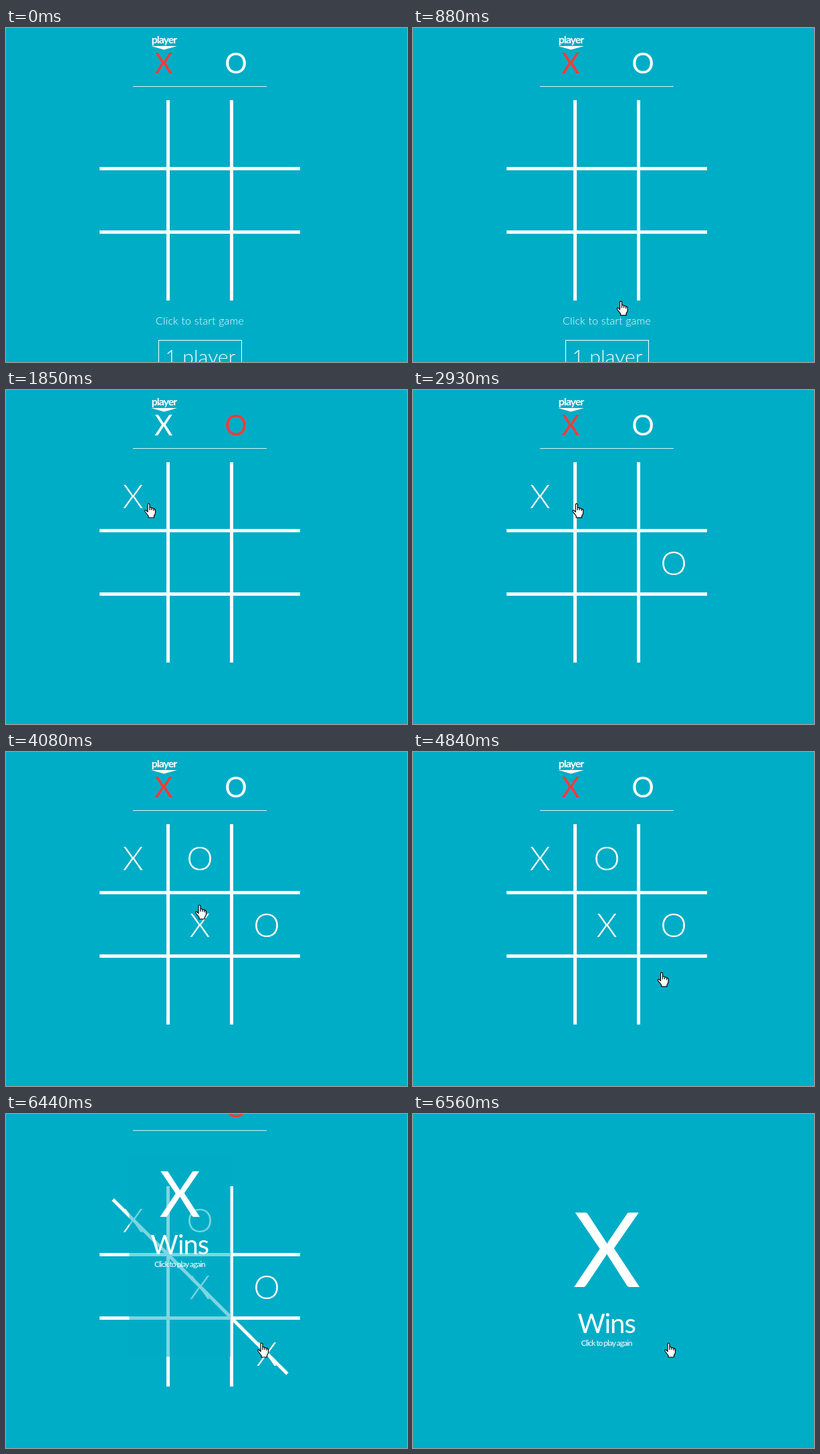
An HTML page that plays this animation: 600x500 px, repeating every 9.77 s.

```html
<!DOCTYPE html>
<html lang="en">
<head>
<meta charset="utf-8">
<title>Tic-tac-toe</title>
<style>
  html, body { margin: 0; width: 100%; height: 100%; overflow: hidden; background: #00adc6; }
  svg { display: block; width: 600px; height: 500px; }
  text { font-family: Lato, sans-serif; fill: #fff; text-anchor: middle; }
  .turn { font-size: 42px; }
  .mark { font-size: 50px; font-weight: 300; }
  .tight { letter-spacing: -1px; }
  .light { font-weight: 300; letter-spacing: .17px; }
</style>
</head>
<body>
<svg viewBox="0 0 600 500">
  <path d="M242.5 108V408M337.5 108V408M140 210.5H440M140 305.5H440" stroke="#fff" stroke-width="5"/>
  <g id="marks"></g>
  <line id="strike" x1="160" y1="128" stroke="#fff" stroke-width="5"/>
  <g id="start">
    <text class="light" x="290" y="444" font-size="16">Click to start game</text>
    <rect x="228.5" y="467.5" width="124" height="60" fill="none" stroke="#fff"/>
    <text class="light" x="291" y="503" font-size="30">1 player</text>
  </g>
  <g id="header">
    <g id="left">
      <text class="tight" x="236.5" y="23" font-size="16" font-weight="700">player</text>
      <path d="M217 27H256L236.500 32.500Z" fill="#fff"/>
      <text class="turn" id="turnX" x="236" y="68">X</text>
    </g>
    <text class="turn" id="turnO" x="344" y="68">O</text>
    <rect x="190" y="87" width="200" height="1" fill="#fff" opacity=".85"/>
  </g>
  <g id="result">
    <rect id="panel" height="300" fill="#00adc6"/>
    <g id="words">
      <text id="winner">X</text>
      <text class="tight" id="wins" font-size="40">Wins</text>
      <text class="tight" id="again" font-size="12">Click to play again</text>
    </g>
  </g>
  <g id="hand" stroke="#000" stroke-width="1.2" stroke-linejoin="round">
    <path d="M5 2Q6.500 0 8 2V7Q10 6 11 8Q13 7 14 9Q16 8.500 16.500 10.500V15Q16 18 14.500 19V22H6V19.500L1 13Q0 10.500 2.500 11L5 13.500Z" fill="#fff"/>
    <path d="M8 7v4M11 8v3M14 9v3" fill="none"/>
  </g>
</svg>
<script>
const LOOP = 9770, WIN = 6020;
const $ = id => document.getElementById(id);
const set = (id, attrs) => {
  for (const key in attrs) $(id).setAttribute(key, attrs[key]);
};
const show = (el, on) => el.style.display = on ? '' : 'none';
const span = (t, from, to) => Math.min(1, Math.max(0, (t - from) / (to - from)));
const smooth = u => u * u * (3 - 2 * u);
const mix = (a, b, u) => a + (b - a) * u;

// time, symbol, column, row
const moves = [[1850, 'X', 0, 0], [2340, 'O', 2, 1], [3590, 'X', 1, 1], [4080, 'O', 1, 0], [WIN, 'X', 2, 2]];
const marks = moves.map(([, symbol, col, row]) => {
  const el = document.createElementNS('http://www.w3.org/2000/svg', 'text');
  el.textContent = symbol;
  el.setAttribute('class', 'mark');
  el.setAttribute('x', 190 + 100 * col);
  el.setAttribute('y', 177 + 100 * row);
  return $('marks').appendChild(el);
});

// from, to, start point, end point, easing
const easeOut = u => 1 - (1 - u) ** 1.6;
const glides = [
  [740, 1540, [340, 495], [207, 169], easeOut],
  [2930, 3140, [238, 169], [275, 195], u => u],
  [3140, 3280, [275, 195], [287, 222], u => u],
  [3280, 3350, [287, 222], [283, 228], u => u],
  [4390, 4960, [283, 228], [376, 342], smooth]
];

function drawHand(t) {
  show($('hand'), t >= 770);
  const [from, to, a, b, ease] = glides.filter(g => t >= g[0]).pop() || glides[0];
  const u = ease(span(t, from, to));
  set('hand', { transform: `translate(${mix(a[0], b[0], u)} ${mix(a[1], b[1], u)})` });
}

function drawResult(t) {
  const p = smooth(span(t, 6320, 6560));
  const x = 230 + 60 * p, top = 18 + 90 * p, line = top + 72 + 148 * p;
  show($('result'), p > 0);
  set('panel', { x: 230 - 90 * p, y: top, width: 300 * p, opacity: p });
  set('words', { opacity: Math.min(1, 4 * p) });
  set('winner', { x, y: top + 29 + 122 * p, 'font-size': 32 + 124 * p });
  set('wins', { x: x - .5, y: line });
  set('again', { x: x - .5, y: line + 18.5 });
  set('header', { transform: `translate(0 ${-124 * p})` });
  set('left', { opacity: Math.max(0, 1 - 3 * p) });
}

function draw(t) {
  const played = moves.filter(m => t >= m[0]).length;
  const over = t >= WIN;
  marks.forEach((el, i) => show(el, i < played));
  show($('start'), !played);
  const color = on => on ? '#f93a3a' : '#fff';
  $('turnX').style.fill = color(over || played % 2 === 0);
  $('turnO').style.fill = color(played % 2 === 1);
  const reach = 261 * span(t, 5940, 6260);
  show($('strike'), over);
  set('strike', { x2: 160 + reach, y2: 128 + reach });
  drawResult(t);
  drawHand(t);
}

const begin = performance.now();
function tick() {
  draw((performance.now() - begin) % LOOP);
  requestAnimationFrame(tick);
}
tick();
</script>
</body>
</html>
```
